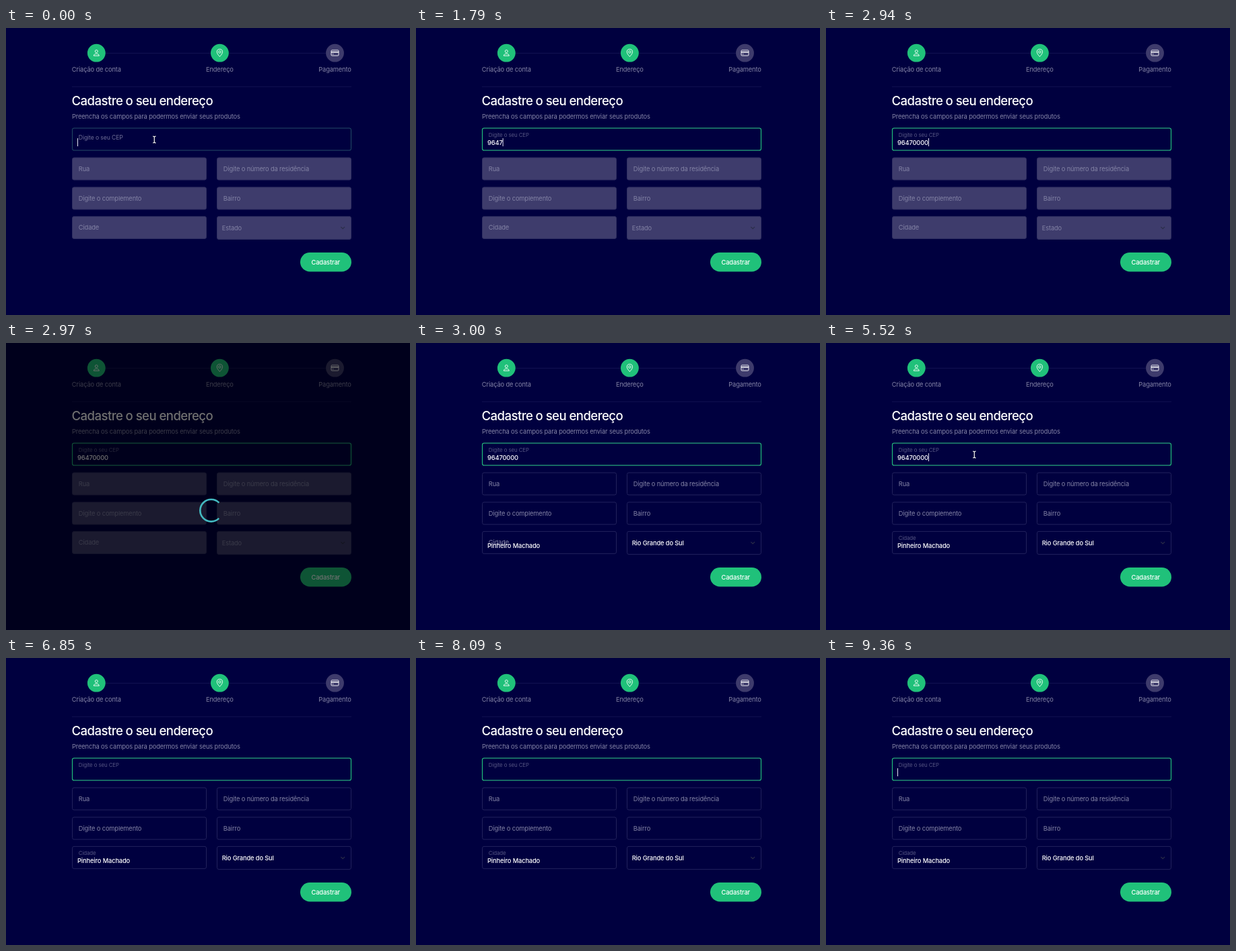
Animation, 600 px wide and 427 px high, one loop 9.39 s. Source, as an HTML page:

```html
<!DOCTYPE html>
<html lang="pt-BR">
<head>
<meta charset="utf-8">
<title>Cadastro de endereço</title>
<style>
  html, body { margin: 0; width: 100%; height: 100%; overflow: hidden; background: #00003f; }
  svg { display: block; width: 600px; height: 427px; }
  text { font: 9.3px Inter, Roboto, sans-serif; letter-spacing: -.014em; fill: #fff; white-space: pre; }
  .muted { fill: #8383a5; }
  .value { font-weight: 500; }
  .title { font-size: 18.6px; font-weight: 500; letter-spacing: -.031em; }
  .mid { text-anchor: middle; }
  .green { fill: #20c17a; }
  .grey { fill: #3e3b6c; }
  .icon { fill: none; stroke: #fff; stroke-width: .9; }
  .rule { stroke: #121250; }
  .field { fill: none; stroke: #22225c; }
  .locked .field { fill: #3e3c6c; stroke: #302f62; }
  .chevron { fill: none; stroke: #2b2e48; stroke-width: 1.1; }
</style>
</head>
<body>
<svg viewBox="0 0 600 427">
  <rect width="600" height="427" fill="#00003f"/>
  <path class="rule" d="M121 37.5H475M98 87.3H513"/>

  <circle class="green" cx="134.3" cy="37.2" r="13.4"/>
  <circle class="green" cx="317.4" cy="37.2" r="13.4"/>
  <circle class="grey" cx="488.5" cy="37.2" r="13.4"/>
  <g class="icon">
    <circle cx="134.3" cy="34.7" r="2"/>
    <path d="M130.3 41.3c0-4 8-4 8 0z"/>
    <path d="M317.4 42.6c-2.5-2.8-4.1-4.8-4.1-7a4.1 4.1 0 0 1 8.2 0c0 2.2-1.6 4.2-4.1 7z"/>
    <circle cx="317.4" cy="35.6" r="1.7"/>
    <rect x="483" y="33" width="11" height="8.2" rx="1.2"/>
    <path d="M483 35.8h11" stroke-width="1.6"/>
    <path d="M484.8 38.8h1.6"/>
  </g>
  <text class="muted mid" x="134.3" y="64.6">Criação de conta</text>
  <text class="muted mid" x="317.4" y="64.6">Endereço</text>
  <text class="muted mid" x="488.5" y="64.6">Pagamento</text>

  <text class="title" x="97.5" y="115.4">Cadastre o seu endereço</text>
  <text class="muted" x="98" y="135">Preencha os campos para podermos enviar seus produtos</text>

  <rect class="field" x="98.5" y="149" width="414" height="33" rx="2.5"/>
  <rect id="ring" x="98.5" y="149" width="414" height="33" rx="2.5" fill="none" stroke="#20c17a" stroke-width="1.15"/>
  <text class="muted" id="zipLabel">Digite o seu CEP</text>
  <text class="value" id="zip" x="106" y="173.5"></text>
  <rect id="caret" y="164" width="1" height="12" fill="#e4e4f0"/>

  <g id="rest"></g>
  <text class="muted" id="cityLabel">Cidade</text>
  <text class="value" id="city" x="106" y="305">Pinheiro Machado</text>
  <text id="state" x="320.7" y="300.8"></text>
  <path class="chevron" d="M497.3 295.8l2.9 2.9l2.9-2.9"/>

  <rect class="green" x="437" y="334" width="76" height="28.5" rx="14.2"/>
  <text class="mid value" x="474.8" y="351.8">Cadastrar</text>

  <defs><path id="beam" d="M-2.2-4.8Q0-4.8 0-3.4Q0-4.8 2.2-4.8M0-3.4V3.4M-2.2 4.8Q0 4.8 0 3.4Q0 4.8 2.2 4.8"/></defs>
  <g id="pointer" fill="none">
    <use href="#beam" stroke="#10102c" stroke-width="2.2"/>
    <use href="#beam" stroke="#f0f0f6" stroke-width="1.2"/>
  </g>

  <g id="loading">
    <rect width="600" height="427" fill-opacity=".56"/>
    <path id="spinner" d="M11.6-11.6A16.4 16.4 0 1 0 11.6 11.6" fill="none" stroke="#43b9c0" stroke-width="2.6"/>
  </g>
</svg>
<script>
const LOOP = 9390, CODE = '96470000';
const FOCUS = -46, BLUR = 4570, REFOCUS = 5200;
const LOAD = 2960, FILLED = 2990; // the lookup starts half a second after the last key
const typed = [790, 1050, 1300, 1560, 1850, 2050, 2250, 2450];
const erased = typed.map((_, i) => 5680 + i * 80);

const $ = id => document.getElementById(id);
const show = (id, on) => $(id).setAttribute('visibility', on ? 'visible' : 'hidden');
const mix = (a, b, p) => a + (b - a) * p;
const ease = (t, start, length) => {
  const p = Math.min(1, Math.max(0, (t - start) / length));
  return p * p * (3 - 2 * p);
};

const fields = [
  [98.5, 193, 'Rua'], [313.5, 193, 'Digite o número da residência'],
  [98.5, 236.9, 'Digite o complemento'], [313.5, 236.9, 'Bairro'],
  [98.5, 280.4, ''], [313.5, 280.4, '', 34]
];
$('rest').innerHTML = fields.map(([x, y, label, h = 33]) =>
  `<rect class="field" x="${x}" y="${y}" width="199" height="${h}" rx="2.5"/>
   <text class="muted" x="${x + 9.3}" y="${y + 19.7}">${label}</text>`).join('');

// A floating label shrinks, rises and dims as p goes from 0 to 1.
function floatLabel(id, y, p) {
  $(id).setAttribute('transform', `translate(107.8 ${mix(y, y - 6.8, p)}) scale(${mix(1, .85, p)})`);
  $(id).setAttribute('opacity', mix(1, .65, p));
}

function draw(t) {
  const count = times => times.filter(k => k <= t).length;
  const filled = t >= FILLED;

  $('zip').textContent = CODE.slice(0, count(typed) - count(erased));
  $('ring').setAttribute('opacity',
    ease(t, FOCUS, 150) - ease(t, BLUR, 150) + ease(t, REFOCUS, 150));
  floatLabel('zipLabel', 168.7, ease(t, FOCUS, 100));
  floatLabel('cityLabel', 300.2, ease(t, FILLED, 100));

  const lastKey = Math.max(...[-50, REFOCUS, ...typed, ...erased].filter(k => k <= t));
  const focused = t < BLUR || t >= REFOCUS;
  $('caret').setAttribute('x', 106 + $('zip').getComputedTextLength());
  show('caret', focused && (t - lastKey) % 1000 < 500);

  $('rest').setAttribute('class', filled ? '' : 'locked');
  show('city', filled);
  $('state').textContent = filled ? 'Rio Grande do Sul' : 'Estado';
  $('state').setAttribute('class', filled ? 'value' : 'muted');

  const pointerY = 166 + 27 * (ease(t, 4450, 100) - ease(t, 4900, 200));
  $('pointer').setAttribute('transform', `translate(220.3 ${pointerY})`);
  show('pointer', t < typed[0] || t >= 4450 && t < erased[0]);

  show('loading', t >= LOAD && t < FILLED);
  $('spinner').setAttribute('transform', `translate(304.7 249.2) rotate(${(t - 2970) * .48})`);
}

const start = performance.now();
function tick() {
  draw((performance.now() - start) % LOOP);
  requestAnimationFrame(tick);
}
tick();
</script>
</body>
</html>
```
